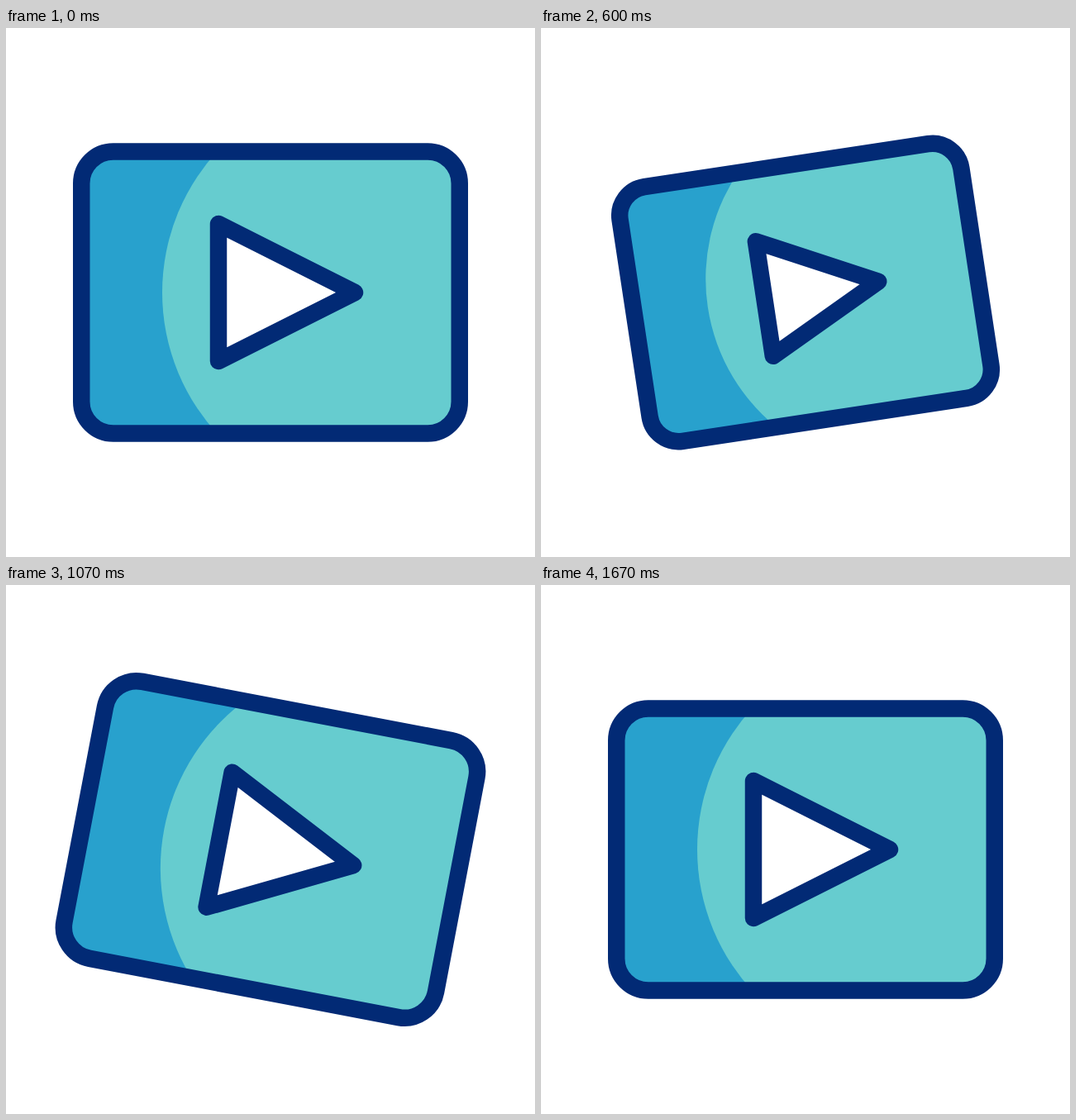
These frames come from a looping animation (640x640 px, 2000 ms). An HTML page:

```html
<!DOCTYPE html>
<html lang="en">
<head>
<meta charset="utf-8">
<title>Play card</title>
<style>
  html, body { margin: 0; height: 100%; overflow: hidden; background: #fff; }
  svg { display: block; width: 100vw; height: 100vh; }
  .line { stroke: #022a75; stroke-width: 20.5; stroke-linejoin: round; }
</style>
</head>
<body>
<svg viewBox="0 0 640 640">
  <defs>
    <rect id="shape" x="-228.75" y="-170.5" width="457.5" height="341" rx="38.5"/>
    <clipPath id="inside"><use href="#shape"/></clipPath>
    <path id="tri" d="M-82.5-83V83L82.5 0Z"/>
  </defs>
  <g id="card">
    <g id="panel" clip-path="url(#inside)">
      <use href="#shape" fill="#28a1cd"/>
      <circle cx="121.5" r="252.5" fill="#66cccf"/>
    </g>
    <g clip-path="url(#inside)">
      <use id="leaving" class="line" href="#tri" fill="#fff"/>
      <use id="entering" class="line" href="#tri" fill="#fff"/>
    </g>
    <use id="border" class="line" href="#shape" fill="none"/>
  </g>
</svg>
<script>
  const LOOP = 2000, FPS = 30, LINE = 20.5, TRI_X = 19.5;
  const $ = id => document.getElementById(id);
  const card = $('card'), panel = $('panel'), border = $('border');
  const leaving = $('leaving'), entering = $('entering');

  // Tracks are [tick, value] pairs, eased between neighbours.
  const tilt = [[11, 0], [28, -23.3], [32.5, 12], [38.5, -6], [45, 3], [50, 0]];
  const cardSize = [[6, 1], [13, 0.825], [23, 1]];
  const triSize = [[6, 1], [13, 0.69], [23, 1]];
  const slideOut = [[33.1, 0], [50, 455]];
  const slideIn = [[33, -366], [49.4, 0]];

  function at(track, tick) {
    const i = track.findIndex(([t]) => t > tick);
    if (i === 0) return track[0][1];
    if (i < 0) return track[track.length - 1][1];
    const [t0, a] = track[i - 1], [t1, b] = track[i];
    const p = (tick - t0) / (t1 - t0);
    return a + (b - a) * p * p * (3 - 2 * p);
  }

  // Scales an outlined shape while its line keeps its weight.
  function place(el, x, size) {
    el.setAttribute('transform', `translate(${x} 0) scale(${size})`);
    el.style.strokeWidth = LINE / size;
  }

  function draw(now) {
    const tick = Math.floor((now % LOOP) * FPS / 1000 + 0.11);
    const size = at(cardSize, tick), tri = at(triSize, tick);
    card.setAttribute('transform', `translate(320 320) rotate(${at(tilt, tick)})`);
    panel.setAttribute('transform', `scale(${size})`);
    place(border, 0, size);
    place(leaving, TRI_X + at(slideOut, tick), tri);
    place(entering, TRI_X + at(slideIn, tick), tri);
  }

  const start = performance.now();
  function loop() {
    draw(performance.now() - start);
    requestAnimationFrame(loop);
  }
  loop();
</script>
</body>
</html>
```
